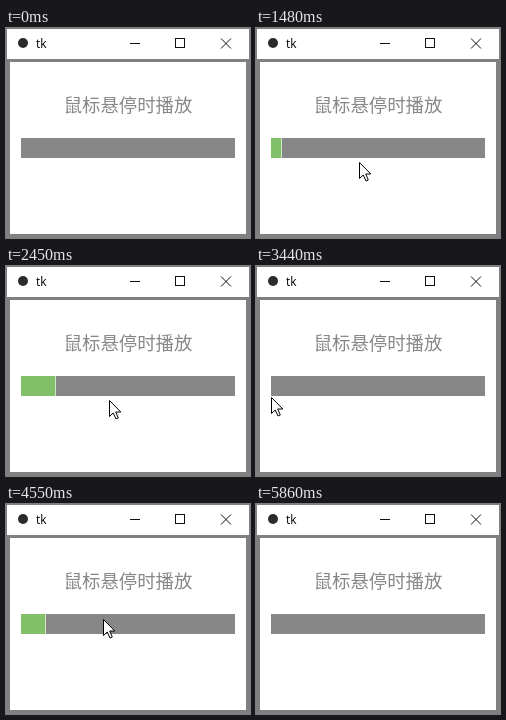
Recreate the animation shown at these times as an HTML page. Size 244 px wide and 210 px high, loop 6.26 s.

```html
<!DOCTYPE html>
<html lang="zh">
<head>
<meta charset="utf-8">
<style>
  html, body { margin: 0; width: 100%; height: 100%; overflow: hidden; background: #fff; }
  svg { display: block; width: 244px; height: 210px; }
</style>
</head>
<body>
<svg viewBox="0 0 244 210">
  <!-- window frame -->
  <rect width="244" height="210" fill="#808080"/>
  <rect x="1" y="1" width="242" height="30" fill="#fff"/>
  <rect x="4" y="34" width="236" height="172" fill="#fff"/>
  <circle cx="17" cy="15" r="5" fill="#2b2b2b"/>
  <text x="30" y="20" font-family="'Open Sans', sans-serif" font-size="12" fill="#000">tk</text>
  <g fill="none" stroke="#111">
    <path d="M124 15.5h10M169.5 10.5h9v9h-9z" shape-rendering="crispEdges"/>
    <path d="M215 10.5l10 10M225 10.5l-10 10"/>
  </g>

  <text x="122" y="83.5" text-anchor="middle" font-family="'Noto Sans CJK SC', 'Noto Sans CJK', sans-serif"
        font-size="18.4" fill="#888">鼠标悬停时播放</text>

  <rect x="15" y="110" width="214" height="20" fill="#878787"/>
  <rect id="fill" x="15" y="110" width="0" height="20" fill="#82bf69"/>
  <rect id="edge" y="110" width="1" height="20" fill="#d3e6ca"/>
  <path id="cursor" d="M.5 .5V16.5L4.2 13L7 19L9.3 18L6.7 12H11.8Z" fill="#fff" stroke="#000"/>
</svg>
<script>
const LOOP = 6260, SPEED = 0.025;
const fill = document.getElementById('fill');
const edge = document.getElementById('edge');
const cursor = document.getElementById('cursor');

// Each hover: pointer enters, rests, leaves; the bar fills from start until the pointer is gone.
const hovers = [
  { enter: 1030, rest: 1400, leave: 2500, gone: 2690, start: 1040, from: [0, 128], at: [103, 134], to: [14, 130] },
  { enter: 3440, rest: 3830, leave: 5400, gone: 5610, start: 3540, from: [15, 131], at: [97, 115], to: [0, 118] }
];

const clamp = v => Math.min(1, Math.max(0, v));
const mix = (a, b, k) => a.map((v, i) => Math.round(v + (b[i] - v) * k));
const show = (el, on) => el.setAttribute('visibility', on ? 'visible' : 'hidden');

function pointer(h, t) {
  if (t < h.leave) {
    const k = clamp((t - h.enter) / (h.rest - h.enter));
    return mix(h.from, h.at, 1 - (1 - k) ** 2);
  }
  return mix(h.at, h.to, clamp((t - h.leave) / (h.gone - h.leave)) ** 2);
}

function draw() {
  const t = performance.now() % LOOP;
  const h = hovers.find(h => t >= h.enter && t < h.gone);
  const width = h ? Math.max(0, Math.round((t - h.start) * SPEED)) : 0;
  fill.setAttribute('width', width);
  edge.setAttribute('x', 14 + width);
  show(edge, width > 0);
  show(cursor, h);
  if (h) cursor.setAttribute('transform', `translate(${pointer(h, t)})`);
  requestAnimationFrame(draw);
}
draw();
</script>
</body>
</html>
```
